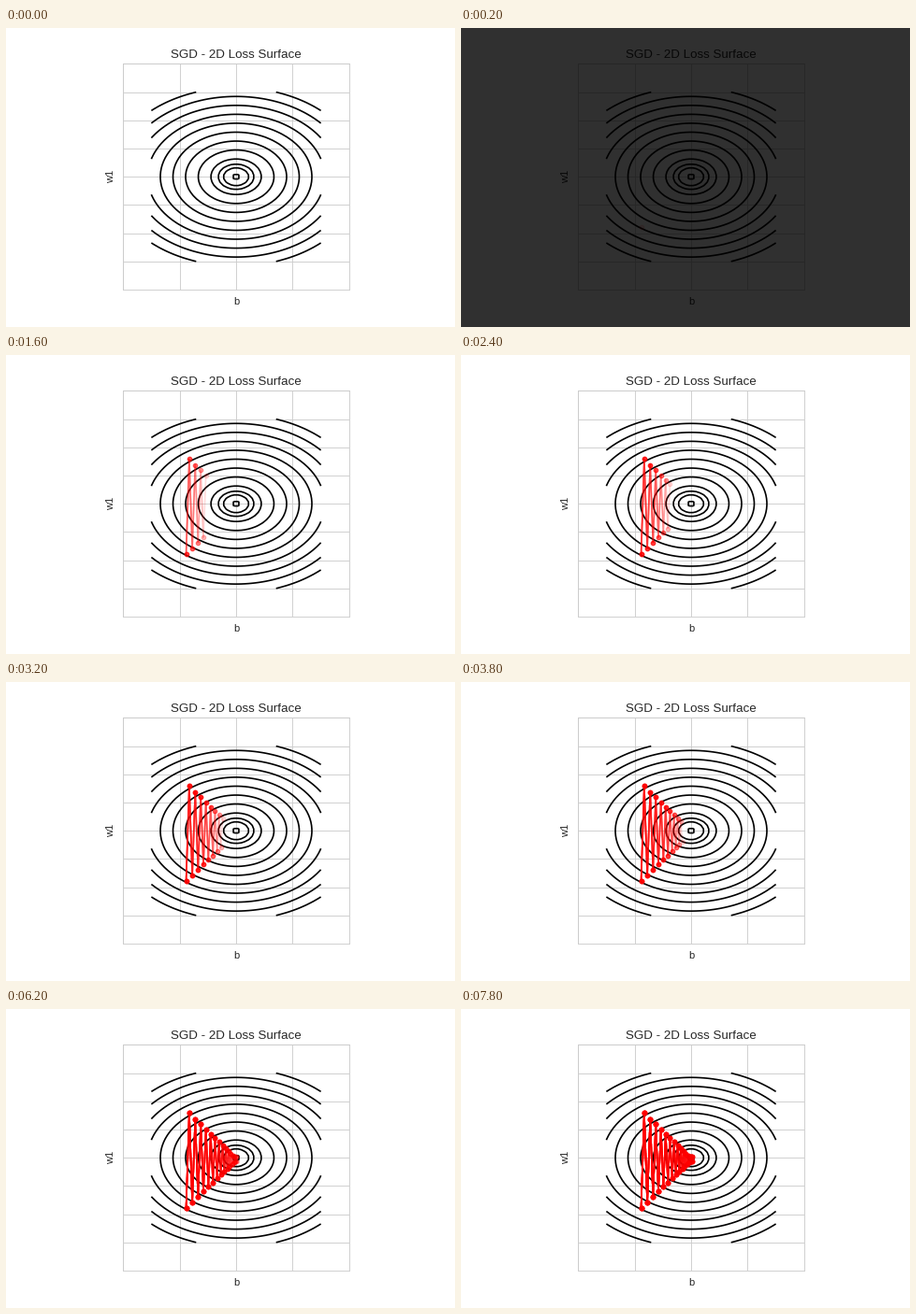
These frames come from a looping animation (480x320 px, 8 s). A matplotlib script:

```python
import numpy as np
import matplotlib.pyplot as plt
from matplotlib.animation import FuncAnimation
from matplotlib.patches import Rectangle

plt.rcParams.update({
    "font.family": "Liberation Sans",
    "text.color": "0.15",
    "axes.labelcolor": "0.15",
    "axes.edgecolor": "0.8",
    "axes.axisbelow": True,
    "grid.color": "0.8",
    "lines.solid_capstyle": "round",
    "xtick.major.size": 0,
    "ytick.major.size": 0,
})

FRAMES = 40
DARK_FRAME = 1


def descent_path(count):
    """Zigzag whose swings shrink quadratically towards the minimum."""
    n = np.arange(count)
    shrink = np.clip(1 - n / 32, 0, 1) ** 2
    sign = np.where(n % 2, 1, -1)
    b = 0.03 - 1.8 * shrink
    w = sign * np.maximum(1.74 * shrink, 0.083) - 0.05
    return b, w


fig, ax = plt.subplots(figsize=(6, 4), dpi=80)
fig.subplots_adjust(left=0.125, right=0.9, bottom=0.125, top=0.88)
ax.set(xlim=(-4, 4), ylim=(-4, 4), aspect="equal",
       xticks=range(-4, 5, 2), yticks=range(-4, 5),
       xlabel="b", ylabel="w1")
ax.set_xticklabels([])
ax.set_yticklabels([])
ax.set_title("SGD - 2D Loss Surface", fontsize=12)
ax.grid(True)

# Elliptic bowl
axis = np.linspace(-3, 3, 50)
B, W = np.meshgrid(axis, axis)
levels = [0.1, 1, 2] + [k * k for k in range(2, 11)]
ax.contour(B, W, 5 * (B**2 + 2 * W**2), levels=levels,
           colors="black", linewidths=1.5)

# Translucent copies of the growing path pile up to solid red
b, w = descent_path(FRAMES)
trails = [
    ax.plot(b[:k], w[:k], "o-", color="red", alpha=0.14,
            markersize=4, linewidth=1.5, zorder=3)[0]
    for k in range(1, FRAMES)
]

shade = fig.add_artist(Rectangle((0, 0), 1, 1, transform=fig.transFigure,
                                 facecolor="black", edgecolor="none",
                                 alpha=0.81, zorder=100))


def update(frame):
    for k, trail in enumerate(trails, start=1):
        trail.set_visible(k <= frame)
    shade.set_visible(frame == DARK_FRAME)
    return [*trails, shade]


anim = FuncAnimation(fig, update, frames=FRAMES, init_func=lambda: update(0),
                     interval=200, repeat=True, repeat_delay=0, blit=False)
plt.show()
```
